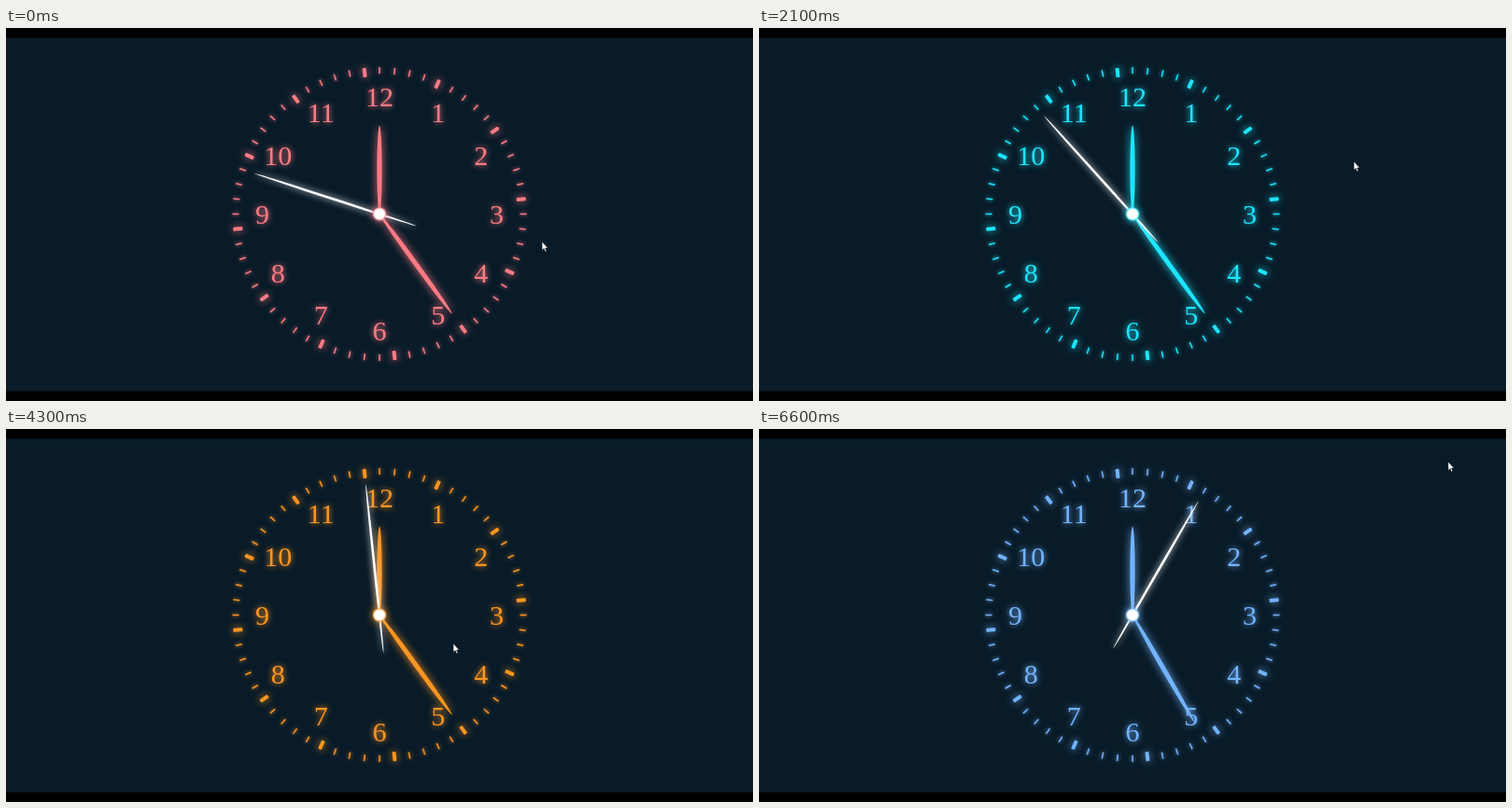
Recreate the animation shown at these times as an HTML page with a canvas. Size 800 by 400 pixels, loop 6.7 s.

```html
<!DOCTYPE html>
<html>
<head>
<meta charset="utf-8">
<style>
html, body { margin: 0; width: 100%; height: 100%; overflow: hidden; background: #000; }
canvas { display: block; }
</style>
</head>
<body>
<canvas id="stage" width="800" height="400"></canvas>
<script>
const ctx = document.getElementById('stage').getContext('2d');
const LOOP = 6700, STEP = 100;
const CX = 400, CY = 199.5, RIM = 157.5;
const RAD = Math.PI / 180;

// Pointer path: time, x, y
const POINTER = [
  [0, 574, 229], [100, 574, 229], [700, 627, 160], [800, 652, 140], [900, 637, 143],
  [2200, 637, 143], [2800, 545, 180], [3200, 402, 227], [3500, 402, 227],
  [4200, 479, 230], [4900, 479, 230], [5600, 660, 45], [5800, 669, 26],
  [6300, 679, 35], [6600, 738, 35]
];

// Luma-preserving hue rotation, clipped per channel
function hue(t) {
  const a = (13 + 0.0908 * t) * RAD, luma = 180, chroma = 212;
  const p = chroma * Math.cos(a), q = -chroma * Math.sin(a);
  const clip = v => Math.round(Math.min(252, Math.max(28, v)));
  return `rgb(${clip(luma + p)},${clip(luma - 0.298 * p - 0.101 * q)},${clip(luma + q)})`;
}

function paint(color, blur) {
  ctx.fillStyle = ctx.shadowColor = color;
  ctx.shadowBlur = blur;
}

function turned(deg, draw) {
  ctx.save();
  ctx.translate(CX, CY);
  ctx.rotate(deg * RAD);
  draw();
  ctx.restore();
}

function hand(deg, from, to, width) {
  turned(deg, () => {
    ctx.beginPath();
    ctx.ellipse(0, -(from + to) / 2, width / 2, (to - from) / 2, 0, 0, 2 * Math.PI);
    ctx.fill();
  });
}

function disc(r) {
  ctx.beginPath();
  ctx.arc(CX, CY, r, 0, 2 * Math.PI);
  ctx.fill();
}

function dial(color) {
  for (let i = 0; i < 60; i++) {
    const major = i % 5 === 4;
    const w = major ? 4 : 1.5, h = major ? 10 : 7;
    paint(color, major ? 8 : 4);
    turned(i * 6, () => {
      ctx.beginPath();
      ctx.roundRect(-w / 2, -RIM, w, h, major ? 1 : 0);
      ctx.fill();
    });
  }
  ctx.font = '30px "Liberation Serif", "Times New Roman", serif';
  ctx.textAlign = 'center';
  paint(color, 6);
  for (let n = 1; n <= 12; n++) {
    const a = n * 30 * RAD;
    ctx.fillText(n, CX + 125.5 * Math.sin(a), CY + 10.3 - 125.5 * Math.cos(a));
  }
}

function pointer(t) {
  let i = 0;
  while (i < POINTER.length - 2 && t >= POINTER[i + 1][0]) i++;
  const [t0, x0, y0] = POINTER[i], [t1, x1, y1] = POINTER[i + 1];
  const k = Math.min(1, (t - t0) / (t1 - t0));
  ctx.save();
  ctx.translate(x0 + (x1 - x0) * k, y0 + (y1 - y0) * k);
  ctx.shadowBlur = 0;
  ctx.fillStyle = '#fff';
  ctx.strokeStyle = '#0b1015';
  ctx.lineWidth = 0.6;
  ctx.fill(ARROW);
  ctx.stroke(ARROW);
  ctx.restore();
}

const ARROW = new Path2D('M0 0V9.4L2.1 7.5L3.5 10.9L5 10.2L3.6 7H6.4Z');

function draw(t) {
  const color = hue(t);
  const sec = 48 + Math.floor(0.00256 * t + 0.3);
  const min = 24 + Math.floor(sec / 60);

  ctx.shadowBlur = 0;
  ctx.fillStyle = '#000';
  ctx.fillRect(0, 0, 800, 400);
  ctx.fillStyle = '#091b28';
  ctx.fillRect(0, 10.5, 800, 379);

  dial(color);
  paint(color, 8);
  hand(0, 0, 95, 5.2);
  hand(min * 6, 0, 132, 5);
  paint('#fff', 7);
  hand(sec * 6, -41, 141, 2.6);
  paint(color, 8);
  disc(7);
  paint('#fff', 3);
  disc(5.8);
  pointer(t);
}

const start = performance.now();
function tick() {
  const t = (performance.now() - start) % LOOP;
  draw(Math.floor(t / STEP) * STEP);
  requestAnimationFrame(tick);
}
tick();
</script>
</body>
</html>
```
